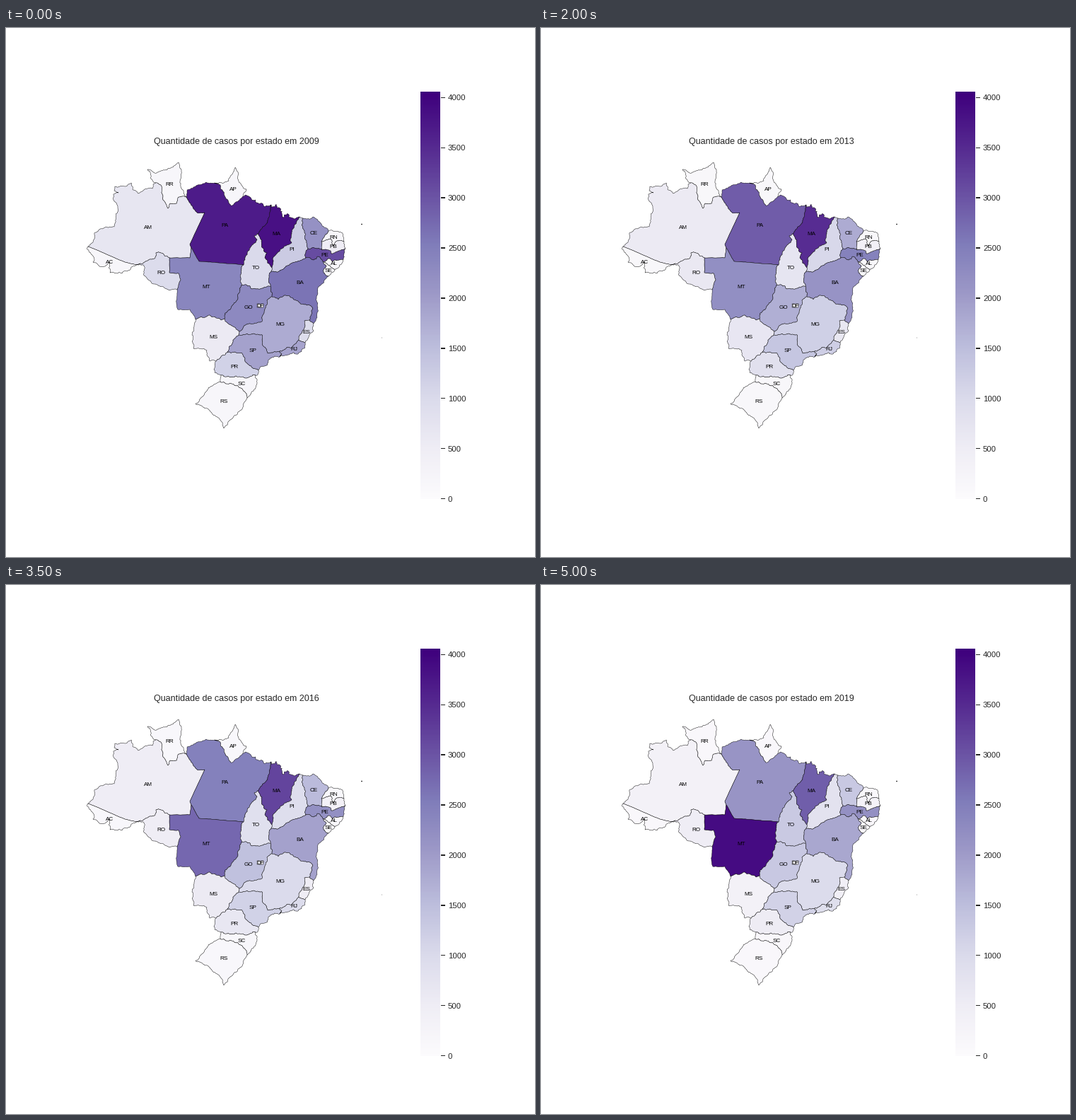
Write a matplotlib script that moves like this. It is 748 px wide and 748 px high and loops after 5500 ms.

```python
import numpy as np
import matplotlib.pyplot as plt
from matplotlib.animation import FuncAnimation
from matplotlib.patches import Polygon, Rectangle

SIZE, DPI = 748, 100
PX = 72 / DPI  # points per pixel
FIRST, COUNT = 2009, 11
VMAX = 4058
INK = "#262626"
plt.rcParams["font.family"] = ["Liberation Sans", "DejaVu Sans"]

rng = np.random.default_rng(7)
arcs = {}


def roughen(p, q, amp):
    """Midpoint displacement from p to q, leaving out q."""
    d = q - p
    length = np.hypot(*d)
    if length < 2:
        return [p]
    shift = np.clip(rng.normal(), -1.5, 1.5) * amp * min(length, 9) / length
    mid = (p + q) / 2 + shift * np.array([-d[1], d[0]])
    return roughen(p, mid, amp) + roughen(mid, q, amp)


def border(states, *xy, amp=0.12):
    """Register one boundary line, from a few key points, for its states."""
    pts = np.array(xy, float).reshape(-1, 2)
    line = [v for p, q in zip(pts, pts[1:]) for v in roughen(p, q, amp)]
    for s in states.split():
        arcs.setdefault(s, []).append(np.array(line + [pts[-1]]))


def outline(state):
    """Join a state's boundary lines end to end into one ring."""
    ring, *rest = arcs[state]
    while rest:
        _, i, k = min((np.hypot(*(a[k] - ring[-1])), i, k)
                      for i, a in enumerate(rest) for k in (0, -1))
        ring = np.vstack([ring, rest.pop(i)[::1 if k == 0 else -1]])
    return ring


def centroid(ring):
    x, y = (ring - ring[0]).T
    x2, y2 = np.roll(x, -1), np.roll(y, -1)
    cross = x * y2 - x2 * y
    return ring[0] + np.array([((x + x2) * cross).sum(),
                               ((y + y2) * cross).sum()]) / (3 * cross.sum())


# North
border("AM", 116, 309, 123, 303, 125, 290, 136, 284, 153, 281, 158, 252,
       152, 243, 152, 235, 159, 233, 153, 230, 154, 224, 169, 224, 177, 219,
       179, 228, 187, 234, 200, 227, 207, 227, 208, 221, 214, 219)
border("RR", 214, 219, 208, 217, 200, 200, 213, 205, 236, 197, 244, 190,
       248, 203, 247, 223, 255, 239)
border("AM RR", 214, 219, 219, 222, 222, 243, 229, 255, 232, 248, 241, 248,
       244, 239, 255, 239, amp=0.08)
border("AM PA", 255, 239, 268, 259, 281, 261)
border("AM PA", 281, 261, 260, 306, 262, 311, amp=0.01)
border("AM MT", 262, 311, 260, 325, 231, 325, amp=0.02)
border("AM RO", 231, 325, 219, 318, 212, 318, 211, 325, 196, 331, 184, 335)
border("AM AC", 116, 309, 168, 331, 184, 335, amp=0.02)
border("AC", 116, 309, 115, 313, 125, 328, 123, 331, 132, 337, 140, 337,
       146, 331, 147, 346, 164, 347, 184, 335)
border("RO", 184, 335, 194, 335, 195, 350, 206, 361, 231, 371, 242, 370)
border("RO MT", 231, 325, 231, 346, 244, 347, 247, 356, 242, 370, amp=0.04)
border("PA", 255, 239, 256, 229, 271, 222, 283, 218, 295, 219)
border("PA AP", 295, 219, 303, 222, 318, 251)
border("AP", 295, 219, 308, 219, 315, 216, 324, 197, 332, 220, 340, 228,
       335, 238, 318, 251)
border("PA", 318, 251, 338, 236, 353, 243, 354, 247, 375, 250, amp=0.2)
border("PA MT", 262, 311, 273, 330, 336, 335, amp=0.02)
border("PA TO", 336, 335, 348, 307, 355, 299, 351, 294, 356, 291)
border("PA MA", 356, 291, 370, 272, 375, 250)

# North-east
border("MA", 375, 250, 388, 255, 392, 268, 395, 264, 415, 267, amp=0.3)
border("MA TO", 356, 291, 362, 300, 363, 311, 369, 318, 366, 325, 376, 339)
border("MA PI", 376, 339, 377, 326, 388, 313, 404, 304, 405, 285, 415, 267)
border("TO PI", 376, 339, 375, 344)
border("PI", 415, 267, 420, 269)
border("PI CE", 420, 269, 419, 277, 427, 312)
border("PI PE", 427, 312, 424, 325)
border("PI BA", 424, 325, 403, 333, 386, 344, 375, 344)
border("CE", 420, 269, 434, 267, 456, 287)
border("CE RN", 456, 287, 446, 302)
border("CE PB", 446, 302, 447, 314)
border("CE PE", 447, 314, 440, 312, 427, 312)
border("RN", 456, 287, 474, 289, 478, 302)
border("RN PB", 478, 302, 470, 301, 462, 308, 460, 299, 446, 302)
border("PB", 478, 302, 480, 312)
border("PB PE", 480, 312, 460, 319, 459, 315, 447, 314)
border("PE", 480, 312, 477, 327)
border("PE AL", 477, 327, 462, 330, 456, 326, 449, 331)
border("PE BA", 449, 331, 441, 323, 435, 328, 424, 325)
border("AL", 477, 327, 465, 342)
border("AL SE", 465, 342, 449, 331)
border("SE", 465, 342, 456, 351)
border("SE BA", 449, 331, 453, 337, 449, 346, 456, 351)

# Centre
border("MT TO", 336, 335, 332, 353, 333, 364)
border("MT GO", 333, 364, 328, 383, 309, 407, 309, 411)
border("MT MS", 309, 411, 304, 413, 288, 406, 268, 412)
border("MT", 242, 370, 241, 385, 243, 398, 260, 398, 268, 412, amp=0.05)
border("TO BA", 375, 344, 372, 350, 374, 365)
border("TO GO", 333, 364, 345, 365, 348, 369, 362, 368, 374, 365)
border("BA GO", 374, 365, 376, 380)
border("GO MG", 376, 380, 369, 385, 362, 415, 340, 419, 330, 429)
border("GO MS", 309, 411, 313, 417, 330, 429)
border("MS MG", 330, 429, 329, 434)
border("MS", 268, 412, 263, 434, 265, 453, 284, 456, 288, 471, 297, 471)
border("MS PR", 297, 471, 313, 458)
border("MS SP", 313, 458, 329, 434)
border("DF", 355, 390, 364, 390, 364, 395, 355, 395, 355, 390, amp=0.03)

# East and south
border("BA MG", 376, 380, 385, 384, 395, 378, 433, 395, 429, 413)
border("BA ES", 429, 413, 435, 418)
border("BA", 456, 351, 441, 368, 440, 409, 435, 418)
border("MG ES", 429, 413, 422, 414, 423, 421, 414, 441)
border("ES", 435, 418, 435, 428, 423, 445)
border("ES RJ", 423, 445, 414, 441)
border("MG RJ", 414, 441, 404, 452, 387, 457)
border("MG SP", 329, 434, 362, 434, 364, 450, 370, 460, 387, 457)
border("RJ", 423, 445, 422, 453, 413, 461, 389, 462, 387, 465, amp=0.18)
border("RJ SP", 387, 465, 390, 461, 387, 457)
border("SP", 387, 465, 371, 471, 357, 484, amp=0.18)
border("SP PR", 313, 458, 334, 460, 343, 476, 357, 484)
border("PR", 297, 471, 295, 487, 304, 491)
border("PR", 357, 484, 353, 491, amp=0.2)
border("PR SC", 353, 491, 338, 495, 325, 492, 304, 491)
border("SC", 304, 491, 303, 500)
border("SC", 353, 491, 354, 505, 341, 523)
border("SC RS", 303, 500, 322, 504, 340, 517, 341, 523)
border("RS", 341, 523, 330, 542, 314, 557, 308, 566)
border("RS", 308, 566, 306, 558, 287, 540, 268, 531, 285, 511, 303, 500)

# Cases in the first, middle and last year; a parabola joins them
CASES = {
    "PA": (3700, 2750, 2130), "MA": (3850, 3380, 2900),
    "MT": (2380, 2350, 3900), "PE": (3100, 2350, 2200),
    "BA": (2640, 2060, 1850), "GO": (2320, 1620, 1330),
    "CE": (2180, 1700, 1330), "SP": (1930, 1280, 1150),
    "RJ": (1900, 1120, 900), "MG": (1780, 1110, 970),
    "PI": (1270, 1000, 800), "PR": (1170, 790, 550),
    "TO": (1020, 740, 1300), "RO": (980, 580, 500),
    "ES": (950, 600, 450), "AM": (700, 560, 380),
    "MS": (600, 680, 350), "PB": (500, 390, 320),
}
FEW = (200, 160, 140)

cmap = plt.get_cmap("Purples")
fig = plt.figure(figsize=(SIZE / DPI, SIZE / DPI), dpi=DPI, facecolor="white")
ax = fig.add_axes([0, 0, 1, 1])

# Colour bar
left, right, top, bottom = 586.5, 614.5, 90, 665.7
ax.imshow(np.linspace(1, 0, 256)[:, None], cmap=cmap, aspect="auto",
          extent=(left, right, bottom, top))
for v in range(0, 4001, 500):
    y = bottom - (bottom - top) * v / VMAX
    ax.add_patch(Rectangle((615, y - 0.6), 6, 1.25, color=INK, lw=0))
    ax.text(625, y, str(v), color=INK, size=11.4 * PX, va="center_baseline")

# Map
shapes, curves = {}, {}
for name in arcs:
    ring = outline(name)
    shapes[name] = ax.add_patch(Polygon(ring, ec="black", lw=0.45 * PX))
    curves[name] = np.polyfit((0, 5, 10), CASES.get(name, FEW), 2)
    ax.text(*centroid(ring), name, color="black", size=8.2 * PX, ha="center",
            va="center_baseline", zorder=5)

# Islands far off the coast
for x, y, r in ((503, 277.5, 0.8), (531.5, 438, 0.35)):
    ax.add_patch(plt.Circle((x, y), r, color="black", lw=0))

title = ax.text(325.4, 164.3, "", color=INK, size=12.5 * PX, ha="center",
                va="baseline")
ax.set(xlim=(0, SIZE), ylim=(SIZE, 0))
ax.axis("off")


def draw(i):
    title.set_text(f"Quantidade de casos por estado em {FIRST + i}")
    for name, shape in shapes.items():
        shape.set_facecolor(cmap(np.polyval(curves[name], i) / VMAX))
    return [title, *shapes.values()]


anim = FuncAnimation(fig, draw, frames=COUNT, interval=500, repeat=True,
                     repeat_delay=0, blit=False)
plt.show()
```
